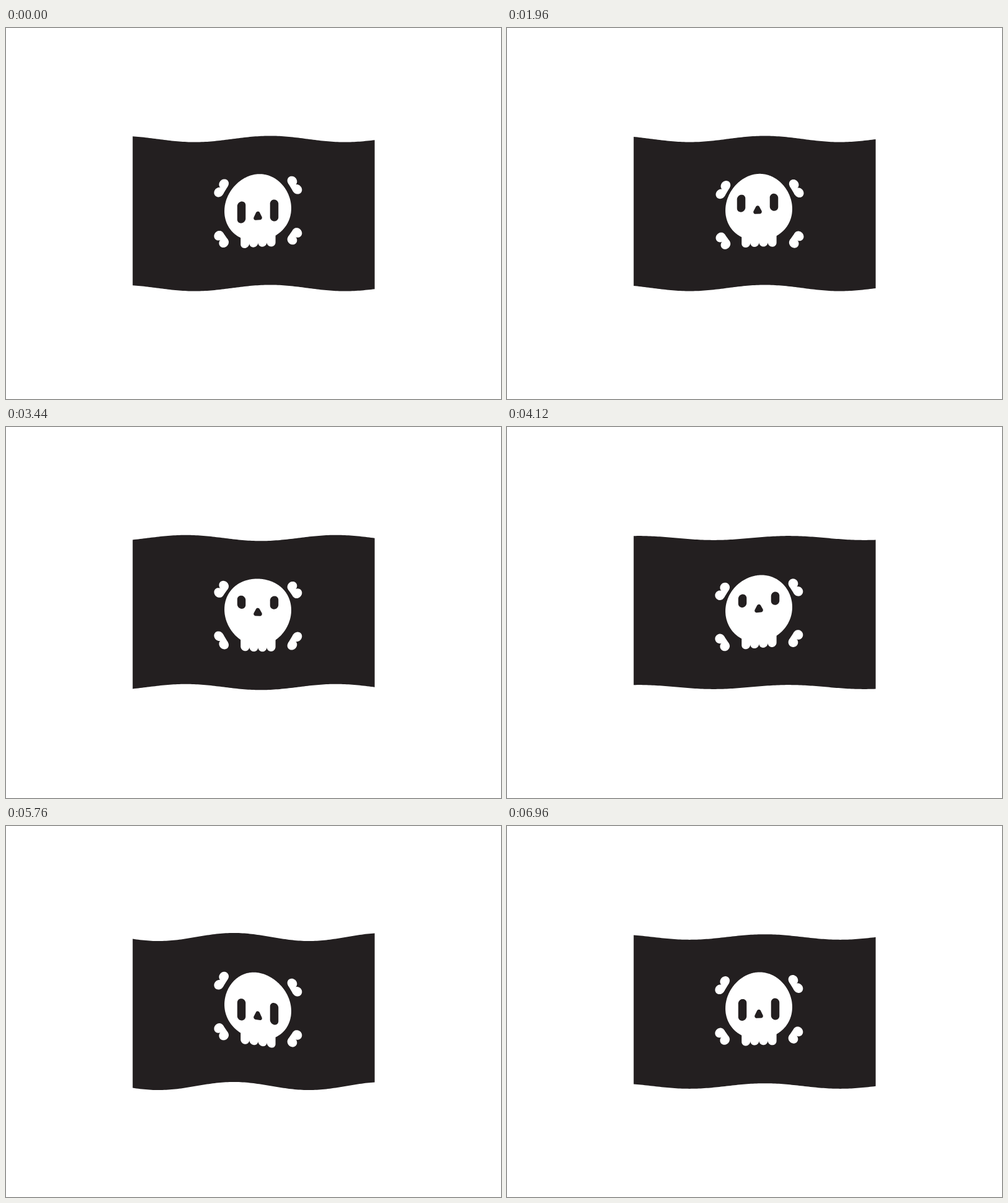
Animation, 800 px wide and 600 px high, one loop 7 s. Source, as an HTML page with a canvas:

```html
<!DOCTYPE html>
<html lang="en">
<head>
<meta charset="utf-8">
<title>Pirate flag</title>
<style>
  html, body { margin: 0; width: 100%; height: 100%; overflow: hidden; background: #fff; }
  canvas { display: block; width: 800px; height: 600px; }
</style>
</head>
<body>
<canvas id="stage" width="800" height="600"></canvas>
<script>
const ctx = document.getElementById('stage').getContext('2d');
const LOOP = 7000, STEP = 40, TAU = Math.PI * 2;
const INK = '#231f20', WHITE = '#fff';
const WAVELENGTH = 243, CREST = 426.5;

// [time, value] keys
const swell = track([[0, 5.05], [800, 3.35], [1000, 3.3], [1440, 3.8], [1960, 5],
  [2200, 6], [2580, 6.8], [2920, 6.3], [3440, 4.8], [4120, 3.4], [4350, 3.3],
  [5040, 4.5], [5760, 6.55], [5950, 6.7], [6500, 5.8], [7000, 4.25]]);
const lookUp = track([[0, 0], [1300, 0], [1960, 0.68], [2500, 1], [4400, 1],
  [5400, -0.15], [5800, -0.15], [6500, 0], [7000, 0]]);
const lookSide = track([[0, 0], [350, 0], [800, 1.2], [1200, 1.2], [1900, -2],
  [2200, -2], [2900, 0], [7000, 0]]);

// Smooth interpolation without overshoot
function track(keys) {
  const d = [];
  for (let i = 0; i < keys.length - 1; i++) {
    d.push((keys[i + 1][1] - keys[i][1]) / (keys[i + 1][0] - keys[i][0]));
  }
  const slope = keys.map((k, i) => {
    if (i === 0) return d[0];
    if (i === d.length) return d[i - 1];
    const a = d[i - 1], b = d[i];
    return a * b > 0 ? 2 * a * b / (a + b) : 0;
  });
  return t => {
    let i = 0;
    while (i < keys.length - 2 && t >= keys[i + 1][0]) i++;
    const [t0, v0] = keys[i], [t1, v1] = keys[i + 1];
    const h = t1 - t0, s = (t - t0) / h, r = 1 - s;
    return v0 * (1 + 2 * s) * r * r + slope[i] * h * s * r * r
      + v1 * s * s * (3 - 2 * s) - slope[i + 1] * h * s * s * r;
  };
}

let now = 0, amp = 0;

function bend([x, y]) {
  const phase = (x - CREST) / WAVELENGTH - now / 1000;
  return [x, y - amp * Math.cos(phase * TAU)];
}

function shape(points, color) {
  ctx.beginPath();
  points.forEach(p => ctx.lineTo(...bend(p)));
  ctx.closePath();
  ctx.fillStyle = color;
  ctx.fill();
}

function arc(x, y, r, from = 0, to = TAU) {
  const n = Math.max(12, Math.ceil(r * (to - from)));
  return Array.from({ length: n + 1 }, (_, i) => {
    const a = from + (to - from) * i / n;
    return [x + r * Math.cos(a), y + r * Math.sin(a)];
  });
}

function drawFlag() {
  const left = 204.7, right = 595.8, top = [], bottom = [];
  for (let i = 0; i <= 130; i++) {
    const x = left + (right - left) * i / 130;
    top.push([x, 179.5]);
    bottom.unshift([x, 420.5]);
  }
  shape(top.concat(bottom), INK);
}

// sx, sy: side of the skull on which the bone end sits
function drawBone(x, y, sx, sy) {
  const r = 7.8, dx = 4, dy = 6.2, len = Math.hypot(dx, dy);
  const a = [x + dx, y - dy * sx * sy];
  const b = [x - dx, y + dy * sx * sy];
  const nx = -sx * dy / len * r, ny = -sy * dx / len * r;
  shape(arc(...a, r), WHITE);
  shape(arc(...b, r), WHITE);
  shape([a, [a[0] + nx, a[1] + ny], [b[0] + nx, b[1] + ny], b], WHITE);
}

function drawSkull() {
  shape(arc(407, 294.7, 54), WHITE);
  const jaw = [[379.2, 325], [435.6, 325]];
  for (let i = 3; i >= 0; i--) {
    jaw.push(...arc(386.25 + 14.1 * i, 351.5, 7.05, 0, Math.PI));
  }
  shape(jaw, WHITE);
}

function drawEye(x, y, h) {
  const r = 6.75, k = h / 2 - r;
  shape([...arc(x, y - k, r, Math.PI, TAU), ...arc(x, y + k, r, 0, Math.PI)], INK);
}

function drawNose(x, y, h) {
  const r = 3.3, k = h / 2 - r;
  shape([
    ...arc(x, y - k, r, -2.65, -0.49),
    ...arc(x + 3.5, y + k, r, -0.49, Math.PI / 2),
    ...arc(x - 3.5, y + k, r, Math.PI / 2, Math.PI + 0.49)
  ], INK);
}

function draw(t) {
  now = t;
  amp = swell(t);
  const up = lookUp(t), side = lookSide(t);

  ctx.fillStyle = WHITE;
  ctx.fillRect(0, 0, 800, 600);
  drawFlag();

  for (const sx of [-1, 1]) {
    for (const sy of [-1, 1]) {
      drawBone(407.3 + 59.2 * sx - side * 0.6, 298 + 41.3 * sy + up * 6, sx, sy);
    }
  }
  drawSkull();

  const eyeY = 300 - 20 * up, eyeH = 35 - 3.1 * up - 10.6 * up * up;
  drawEye(380.5 + side, eyeY, eyeH);
  drawEye(433.5 + side, eyeY, eyeH);
  drawNose(407 + side, 308 - 13.6 * up, 13.8 - 0.8 * up);
}

const start = performance.now();
function tick() {
  const t = (performance.now() - start) % LOOP;
  draw(Math.floor(t / STEP) * STEP);
  requestAnimationFrame(tick);
}
tick();
</script>
</body>
</html>
```
